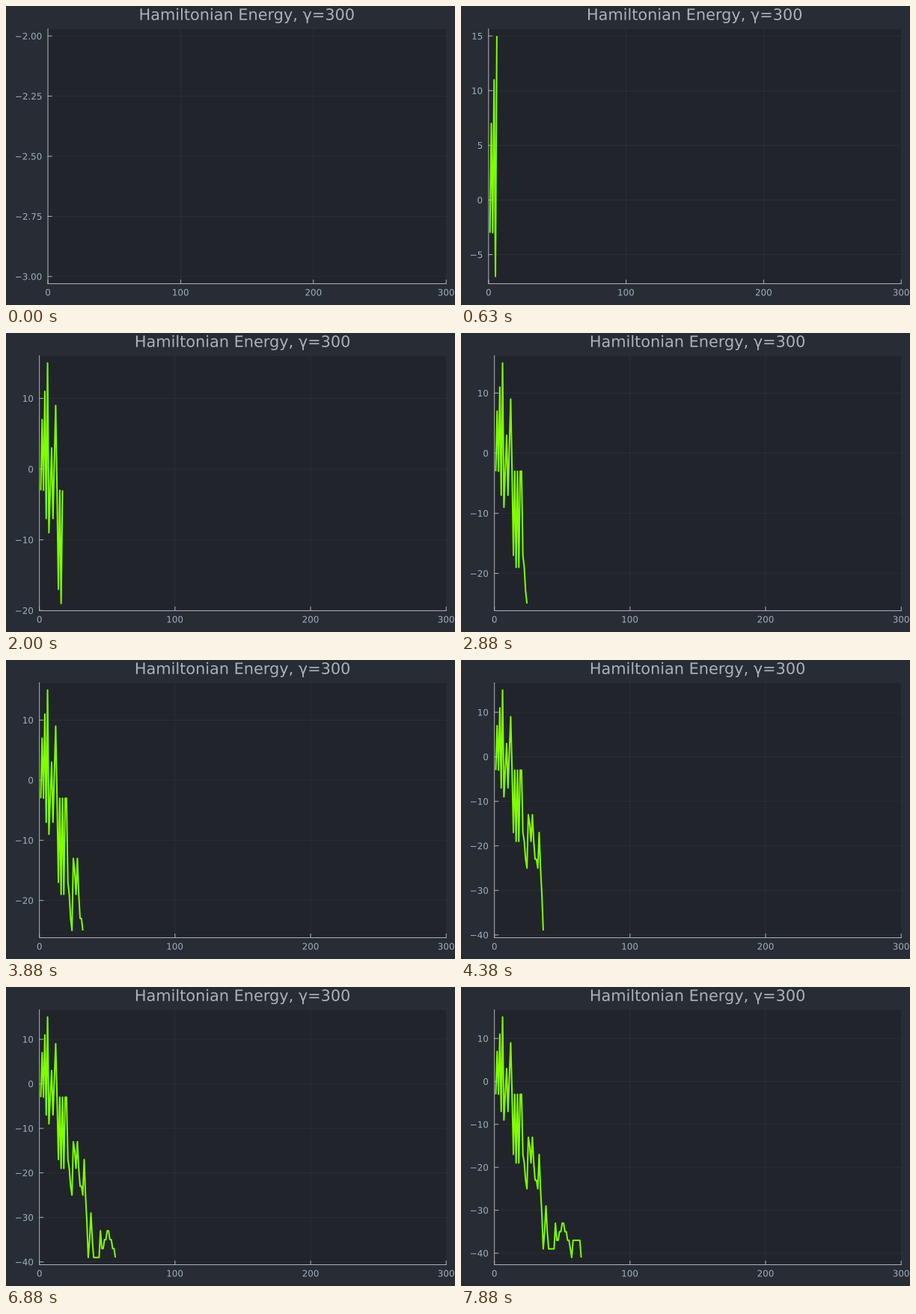
Write a matplotlib script that moves like this. It is 600 px wide and 400 px high and loops after 8000 ms.

```python
import matplotlib.pyplot as plt
import numpy as np
from matplotlib.animation import FuncAnimation
from matplotlib.patches import PathPatch, Rectangle
from matplotlib.textpath import TextPath
from matplotlib.transforms import Affine2D

plt.rcParams["font.family"] = "DejaVu Sans"

PX = 0.72  # points per pixel at 100 dpi
BG, PANEL, FG, LABEL, LINE = "#282C34", "#21252B", "#ADB2B7", "#9EB1BE", "#7FFF00"
TOP, BOTTOM, RIGHT = 30.5, 371.5, 588.2
SMALL, LARGE = 11.9, 20.83
STEPS, X_MAX = 64, 300
TICK = 5

# Turning points of the descent, as (step, energy)
TURNS = [(7, -9), (9, 3), (10, -7), (12, 9), (14, -17), (18, -19), (20, -3),
         (21, -17), (24, -25), (25, -13), (27, -19), (28, -13), (30, -23),
         (32, -25), (33, -17), (36, -39), (38, -29), (40, -39), (44, -39),
         (45, -33), (46, -37), (51, -33), (56, -39)]


def energy(n):
    if n < 7:  # growing oscillation
        return 3 + (-1) ** n * 2 * max(n, 4 - n)
    if 14 < n < 20 and n % 2:  # spikes
        return -3
    if n > 56:  # settled, with a regular dip
        return -41 if n % 7 == 1 else -37
    level = np.interp(n, *zip(*TURNS))
    return 2 * round((level - 1) / 2) + 1  # energies are odd


ENERGY = np.array([energy(n) for n in range(1, STEPS + 1)])

fig = plt.figure(figsize=(6, 4), dpi=100, facecolor=BG)
ax = fig.add_axes([0, 0, 1, 1])


def limits(values):
    lo, hi = values.min(), values.max()
    if lo == hi:
        hi = lo + 1
    pad = 0.03 * (hi - lo)
    return lo - pad, hi + pad


def nice_ticks(lo, hi):
    """Coarsest step that leaves at least four ticks."""
    for step in (10, 5, 2, 0.25):
        ticks = np.arange(np.ceil(lo / step), np.floor(hi / step) + 1) * step
        if len(ticks) >= 4:
            break
    digits = 2 if step < 1 else 0
    names = [f"{t + 0.0:.{digits}f}".replace("-", "−") for t in ticks]
    return ticks, names


def ink(text, size=SMALL):
    path = TextPath((0, 0), text, size=size)
    return path, path.get_extents()


def label(x, y, text, size=SMALL, color=LABEL, align=0.5):
    """Text with its baseline at y; align 0.5 centres it, 1 ends it at x."""
    path, box = ink(text, size)
    place = Affine2D().translate(-box.x0 - align * box.width, 0).scale(1, -1)
    ax.add_patch(PathPatch(place.translate(x, y).transform_path(path),
                           facecolor=color, lw=0, snap=False))


def stroke(xs, ys, color=FG, width=1.0, **kw):
    ax.plot(xs, ys, color=color, lw=width * PX, snap=False, **kw)


def grid(xs, ys):
    stroke(xs, ys, width=0.65, alpha=0.1)


def draw(frame):
    ax.clear()
    ax.set(xlim=(0, 600), ylim=(400, 0))
    ax.axis("off")

    values = ENERGY[:frame + 1]
    lo, hi = limits(values)
    ticks, names = nice_ticks(lo, hi)
    left = 21.6 + max(ink(name)[1].width for name in names)

    def to_x(v):
        return left + (RIGHT - left) * v / X_MAX

    def to_y(v):
        return TOP + (BOTTOM - TOP) * (hi - v) / (hi - lo)

    ax.add_patch(Rectangle((left, TOP), RIGHT - left, BOTTOM - TOP,
                           facecolor=PANEL, lw=0))
    label((left + RIGHT) / 2, 18.7, "Hamiltonian Energy, γ=300", LARGE, FG)

    for v in range(0, X_MAX + 1, 100):
        x = to_x(v)
        if v < X_MAX:
            grid([x, x], [TOP, BOTTOM])
        stroke([x, x], [BOTTOM, BOTTOM - TICK])
        label(x, 387.4, str(v))
    for v, name in zip(ticks, names):
        y = to_y(v)
        grid([left, RIGHT], [y, y])
        stroke([left, left + TICK], [y, y])
        label(left - 8.6, y + 4.5, name, align=1)

    stroke([left, left], [TOP, BOTTOM])
    stroke([left, RIGHT], [BOTTOM, BOTTOM])

    if len(values) > 1:
        steps = np.arange(1, len(values) + 1)
        stroke(to_x(steps), to_y(values), LINE, 2,
               solid_joinstyle="round", solid_capstyle="butt")
    return []


anim = FuncAnimation(fig, draw, frames=STEPS, init_func=lambda: draw(0),
                     interval=125, repeat=True, repeat_delay=0)
plt.show()
```
